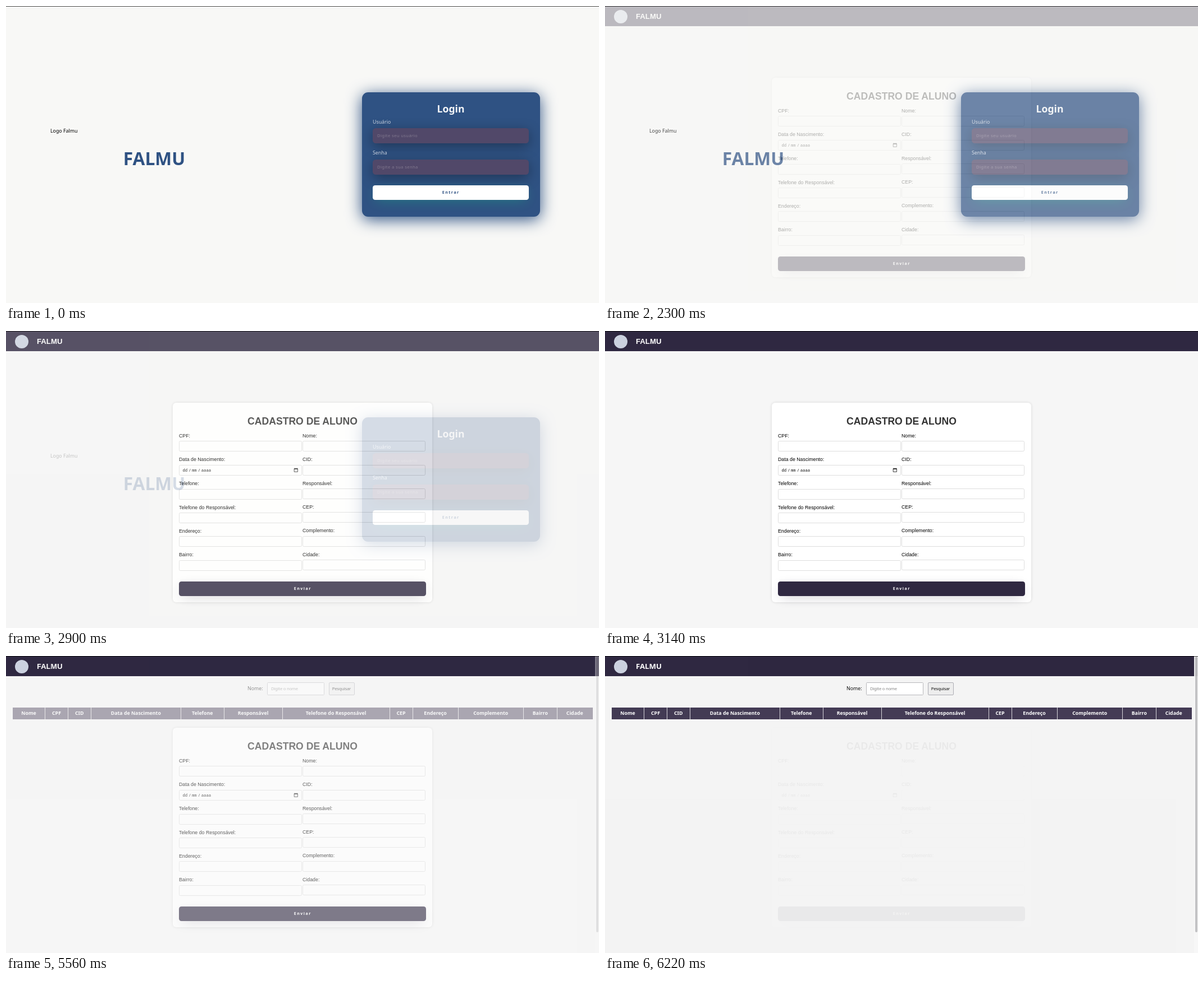
Animation of 1056x530 px, one loop 8280 ms. Source, as an HTML page:

```html
<!DOCTYPE html>
<html lang="pt-BR">
<head>
<meta charset="utf-8">
<title>Cadastro de aluno</title>
<style>
  html, body { margin: 0; width: 100%; height: 100%; overflow: hidden; }
  .stage { position: relative; width: 1056px; height: 530px; overflow: hidden; }
  .page, .page svg { position: absolute; left: 0; top: 0; width: 1056px; height: 530px; overflow: hidden; }
  .box { position: absolute; box-sizing: border-box; }
  .rule { position: absolute; left: 0; top: 0; width: 1056px; height: 1px; background: rgba(0, 0, 0, .7); }

  .login { background: #f8f8f6; }
  .form { background: #f6f6f6; animation: form 8280ms infinite; }
  .list { background: #f4f4f4; animation: list 8280ms infinite; }

  /* Stepped cross-fades, 60 ms per step; the second one stops at 95 % */
  @keyframes form {
    0% { opacity: 0; animation-timing-function: step-end; }
    24.879% { opacity: .1; animation-timing-function: steps(18, end); }
    37.922%, 100% { opacity: 1; }
  }
  @keyframes list {
    0% { opacity: 0; animation-timing-function: step-end; }
    62.801% { opacity: .1; animation-timing-function: steps(17, end); }
    75.12%, 100% { opacity: .95; }
  }

  .panel { background: #2f5283; border-radius: 11px; box-shadow: 0 5px 28px #2f5283; }
  .field { background: #514869; border-radius: 5.5px; box-shadow: 0 5.5px 22px #00000056; }
  .enter { background: #fff; border-radius: 4.4px; box-shadow: 0 5.5px 22px -6.6px #00ff8052; }
  .bar { background: #2f2841; }
  .logo { background: #cbd1df; border-radius: 50%; }
  .card { background: #fff; border-radius: 6px; box-shadow: 0 0 5.5px rgba(0, 0, 0, .13); }
  .input { background: #fff; border: 1px solid #dedede; border-radius: 2.5px; }
  .send { background: #2f2841; border-radius: 4.4px; box-shadow: 0 5.5px 22px -6.6px #2f284152; }
  .search { background: #fff; border: 1px solid #b4b4b8; border-radius: 1.5px; }
  .find { background: #ededed; border: 1px solid #a9a9b0; border-radius: 2px; }
  .head { background: #3a314c; }
  .line { background: #d4d2d8; }
  .track { background: #f7f7f7; }
  .thumb { background: #bfbfc1; border-radius: 2px; }

  text { font: 8.8px "Noto Sans", sans-serif; white-space: pre; }
  .mid { text-anchor: middle; }
  .bold { font-weight: 700; }
  .white { fill: #fff; }
  .brand { font-size: 31.68px; fill: #2f5283; }
  .title { font-size: 17.6px; fill: #f3f5f8; }
  .soft { fill: #c9d2de; }
  .hint { font-size: 7.7px; letter-spacing: .36px; fill: #81788f; }
  .small { font-size: 7.7px; letter-spacing: -.24px; }
  .gray { fill: #808080; }
  .action { font-size: 7px; letter-spacing: 1.5px; }
  .blue { fill: #2f5283; }
  .arial { font-family: "Liberation Sans", Arial, sans-serif; }
  .top { font-size: 13.2px; }
  .h1 { font-size: 17.6px; fill: #333; }
  .mono { font: 7.2px "Noto Sans Mono", monospace; fill: #111; }
</style>
</head>
<body>
<div class="stage">
  <div class="page login"></div>
  <div class="page form"></div>
  <div class="page list"></div>
  <div class="rule"></div>
</div>
<script>
  const NS = 'http://www.w3.org/2000/svg';

  function open(name) {
    const page = document.querySelector('.' + name);
    const svg = document.createElementNS(NS, 'svg');
    page.append(svg);
    return {
      svg,
      box(cls, x0, y0, x1, y1) {
        const el = document.createElement('div');
        el.className = 'box ' + cls;
        el.style.cssText = `left:${x0}px;top:${y0}px;width:${x1 - x0}px;height:${y1 - y0}px`;
        page.insertBefore(el, svg);
      },
      text(cls, x, y, str) {
        const el = document.createElementNS(NS, 'text');
        el.setAttribute('class', cls);
        el.setAttribute('x', x);
        el.setAttribute('y', y);
        el.textContent = str;
        svg.append(el);
      }
    };
  }

  function header(p, cls, y) {
    p.box('bar', 0, 0, 1056, 36.3);
    p.box('logo', 15.7, 6.5, 39.7, 30.5);
    p.text('top bold white ' + cls, 55, y, 'FALMU');
  }

  // Login
  const login = open('login');
  login.text('', 79, 225.5, 'Logo Falmu');
  login.text('brand bold mid', 264, 284, 'FALMU');
  login.box('panel', 633.5, 154.3, 950.5, 376.3);
  login.text('title bold mid', 792, 190, 'Login');
  [['Usuário', 'Digite seu usuário'], ['Senha', 'Digite a sua senha']].forEach(([label, hint], i) => {
    const y = i * 55.6;
    login.text('soft', 653, 209.7 + y, label);
    login.box('field', 653, 218.2 + y, 931, 245.2 + y);
    login.text('hint', 661, 234.3 + y, hint);
  });
  login.box('enter', 653, 319.8, 931, 346.2);
  login.text('action bold blue mid', 792.3, 335, 'Entrar');

  // Student form
  const form = open('form');
  header(form, 'arial', 22.6);
  form.box('card', 297, 127.8, 759, 484.5);
  form.text('arial h1 bold mid', 528, 167, 'CADASTRO DE ALUNO');
  const left = ['CPF', 'Data de Nascimento', 'Telefone', 'Telefone do Responsável', 'Endereço', 'Bairro'];
  const right = ['Nome', 'CID', 'Responsável', 'CEP', 'Complemento', 'Cidade'];
  left.forEach((label, i) => {
    const y = i * 42.3, shift = i > 1 ? .6 : 0;
    form.text('arial', 308, 190 + y + shift, label + ':');
    form.box('input', 308, 196.4 + y + shift, 527, 215.5 + y + (i ? .6 : 0));
    form.text('arial', 528, 190 + y, right[i] + ':');
    form.box('input', 528, 196.4 + y, 747, 215.5 + y);
  });
  [[314.5, 'dd'], [325.3, '/'], [331, 'mm'], [341.8, '/'], [347.8, 'aaaa']]
    .forEach(([x, str]) => form.text('mono', x, 251, str));
  const icon = document.createElementNS(NS, 'path');
  icon.setAttribute('d', 'M513.2 245.5h6.2v5.8h-6.2zM513.2 246.4h6.2M514.7 244.3v1.2M518 244.3v1.2');
  icon.setAttribute('fill', 'none');
  icon.setAttribute('stroke', '#222');
  icon.setAttribute('stroke-width', '.9');
  form.svg.append(icon);
  form.box('send', 308, 447.2, 748, 473.4);
  form.text('action bold white mid', 528.3, 462.4, 'Enviar');

  // Student list
  const list = open('list');
  header(list, '', 23.4);
  list.box('track', 1049.3, 0, 1056, 530);
  list.box('thumb', 1050.5, 1, 1055, 492.5);
  list.text('', 430, 60.6, 'Nome:');
  list.box('search', 465.3, 47, 567.5, 69.5);
  list.text('small gray', 472, 60.5, 'Digite o nome');
  list.box('find', 574.5, 47, 620.5, 69.5);
  list.text('small mid', 597.4, 60.5, 'Pesquisar');
  list.box('head', 11.5, 92, 1044.5, 112.7);
  const edges = [11.5, 69.5, 110.5, 151, 311.5, 388, 492, 683, 724, 805, 921.5, 981, 1044.5];
  ['Nome', 'CPF', 'CID', 'Data de Nascimento', 'Telefone', 'Responsável', 'Telefone do Responsável',
    'CEP', 'Endereço', 'Complemento', 'Bairro', 'Cidade'].forEach((label, i) => {
    if (i) list.box('line', edges[i] - .5, 92, edges[i] + .5, 112.7);
    list.text('bold white mid', (edges[i] + edges[i + 1]) / 2, 105.4, label);
  });
</script>
</body>
</html>
```
